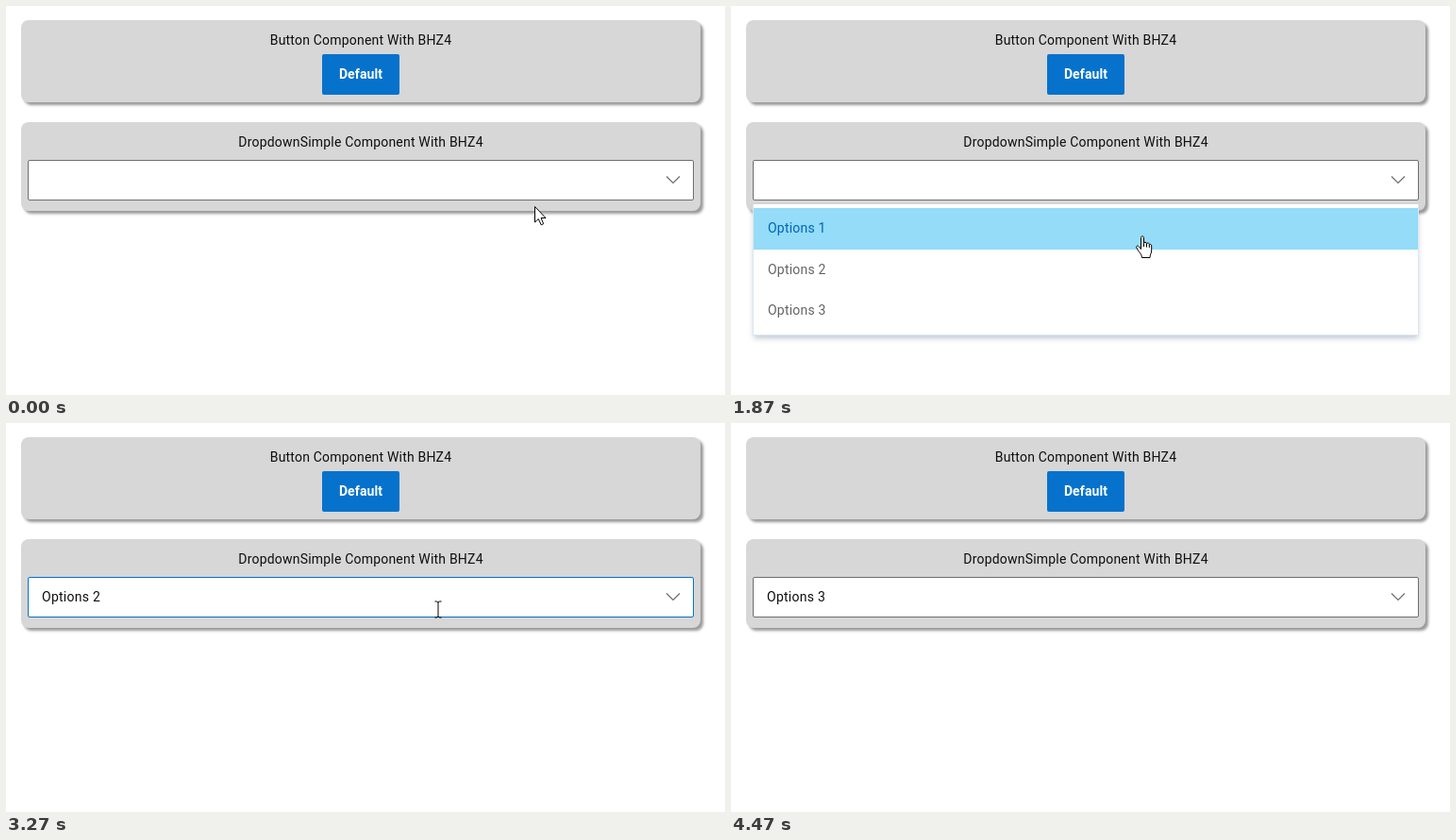
An HTML page for the animation above (4.99 s loop, 762 by 412 pixels).

```html
<!DOCTYPE html>
<html lang="en">
<head>
<meta charset="utf-8">
<title>Dropdown demo</title>
<style>
  html, body { margin: 0; width: 100%; height: 100%; overflow: hidden; background: #fff; }
  body { position: relative; font: 14px/20px Roboto, sans-serif; letter-spacing: .2px; color: #0e0e0e; }
  div, svg { position: absolute; box-sizing: border-box; white-space: pre; }
  svg { left: 0; top: 0; width: 762px; height: 412px; fill: none; }
  .card { left: 16px; width: 720px; padding-top: 11px; text-align: center; border-radius: 8px;
    background: #d7d7d7; box-shadow: 3px 3px 3px #999; }
  #button { left: 335px; top: 51px; width: 82px; height: 43px; border-radius: 2px; background: #0672cb;
    color: #fff; font-weight: 700; line-height: 43px; letter-spacing: .1px; text-align: center; }
  #ring { left: 19px; top: 159px; width: 714px; height: 51px; border: 2px solid #00468b; border-radius: 4px; background: #fff; }
  #field { left: 23px; top: 163px; width: 706px; height: 43px; border: 1px solid #6e6e6e; border-radius: 2px;
    background: #fff; padding-left: 14px; line-height: 41px; letter-spacing: .25px; }
  #field.active { border-color: #0672cb; }
  #caret { top: 175px; width: 1px; height: 18px; background: #000; }
  #menu { left: 23px; top: 210px; width: 706px; height: 139px; background: #fff; border: solid #dde6f0;
    border-width: 0 1px 1px; box-shadow: 0 4px 6px -1px rgba(0, 43, 85, .25); }
  .row { left: 0; width: 704px; height: 43.5px; padding-left: 15px; line-height: 42px; color: #636363; }
  .row svg { left: 675px; top: 16px; width: 16px; height: 12px; stroke: currentColor; stroke-width: 1.4; }
  .hover { background: #d9f5fd; color: #0063b8; }
  .pressed { background: #94dcf7; }
</style>
</head>
<body>
<div class="card" style="top:15px;height:87px">Button Component With BHZ4</div>
<div id="button">Default</div>
<div class="card" style="top:123px;height:94px">DropdownSimple Component With BHZ4</div>
<div id="ring"></div>
<div id="field"></div>
<div id="caret"></div>
<svg stroke="#6e6e6e" stroke-width="1.2"><path d="M700 180.5l7 7 7-7"/></svg>
<div id="menu"></div>
<svg><g id="cursor" stroke="#000" stroke-linejoin="round">
  <path id="arrow" fill="#fff" d="M0 0V16.5L3.8 13 6.7 19.3 9.2 18.2 6.5 12H11.5Z"/>
  <g id="hand" transform="translate(-6.5 .5)">
    <path fill="#fff" d="M5.5 14.5V2.5C5.5.3 8.5.3 8.5 2.5V8.5c0-1.8 3-1.6 3 0V9c.2-1.5 2.8-1.3 2.8.4v.9c.2-1.3 2.4-1.2 2.4.6V16C16.7 19 15 20 15 23.5H6.5C6.5 20 4 18.5 2.5 16L.8 13C0 11.2 2.2 10.3 3.5 12Z"/>
    <path d="M8.5 8.5V12M11.5 9v3.5M14.3 10v3"/>
  </g>
  <path id="beam" d="M-3 -8.5H-1L.5 -7.5 2 -8.5H4M.5 -7.5V7.5M-3 8.5H-1L.5 7.5 2 8.5H4"/>
</g></svg>
<script>
const LOOP = 4990, TICK = 1000 / 15;
const MENU_TOP = 214, ROW = 43.5, FIELD_Y = 186;
const $ = id => document.getElementById(id);
const show = (el, on) => { el.style.visibility = on ? 'visible' : 'hidden'; };
const rowY = i => MENU_TOP + ROW * (i + .5);

// Each cycle picks the next option; times are in ticks
const cycles = [
  { focus: 8, open: 12, press: 27, release: 30 },
  { focus: 35, open: 37, press: 45, release: 47 },
  { focus: 51, open: 53, press: 61, release: 63 }
];

// Pointer moves: start, end, x, y. It browses the first menu, then goes straight to its row.
const moves = [
  [0, 2, 538, FIELD_Y], [8, 13, 496, 219], [13, 19, 459, rowY(2)],
  [19, 21, 453, MENU_TOP], [21, 25, 436, rowY(0) + 7]
];
for (const i of [1, 2]) {
  const x = 447 + 6 * i, { focus, open, press } = cycles[i];
  moves.push([cycles[i - 1].release, focus, x, FIELD_Y], [open, press, x, rowY(i)]);
}
moves.push([63, 67, 452, 420]);

const rows = cycles.map((_, i) => {
  const row = document.createElement('div');
  row.style.top = 4 + ROW * i + 'px';
  row.innerHTML = `Options ${i + 1}<svg><path d="M.5 5.5L5 10 14 1"/></svg>`;
  $('menu').append(row);
  return row;
});

function pointer(n) {
  let x = 561, y = 213;
  for (const [start, end, toX, toY] of moves) {
    const k = Math.min(Math.max((n - start) / (end - start), 0), 1);
    const ease = 1 - (1 - k) ** 3;
    x += (toX - x) * ease;
    y += (toY - y) * ease;
  }
  return [Math.round(x), Math.round(y)];
}

function draw(t) {
  const n = Math.floor((t + 4) / TICK);
  const [x, y] = pointer(n);
  const cycle = cycles.find(c => n >= c.focus && n < c.release);
  const value = cycles.filter(c => n >= c.release).length;
  const focus = cycle && n < cycle.press;
  const open = cycle && n >= cycle.open;
  const overField = y >= 163 && y < 206;
  const row = open ? Math.floor((y - MENU_TOP) / ROW) : -1;

  $('field').textContent = value ? 'Options ' + value : '';
  $('field').className = focus || overField ? 'active' : '';
  show($('ring'), focus);
  show($('caret'), focus && Math.floor((n - cycle.focus) / 7.5) % 2 === 0);
  $('caret').style.left = (value ? 100 : 38) + 'px';

  // Rows react shortly after the menu opens
  const ready = open && n >= cycle.open + 2;
  show($('menu'), open);
  rows.forEach((el, i) => {
    el.className = 'row' + (ready && i === row ? ' hover' + (focus ? '' : ' pressed') : '');
    show(el.lastChild, open && value === i + 1);
  });

  const kind = row >= 0 ? 'hand' : overField ? 'beam' : 'arrow';
  for (const id of ['arrow', 'hand', 'beam']) show($(id), id === kind);
  $('cursor').setAttribute('transform', `translate(${x - .5} ${y - .5})`);
}

const start = performance.now();
(function frame() {
  draw((performance.now() - start) % LOOP);
  requestAnimationFrame(frame);
})();
</script>
</body>
</html>
```
